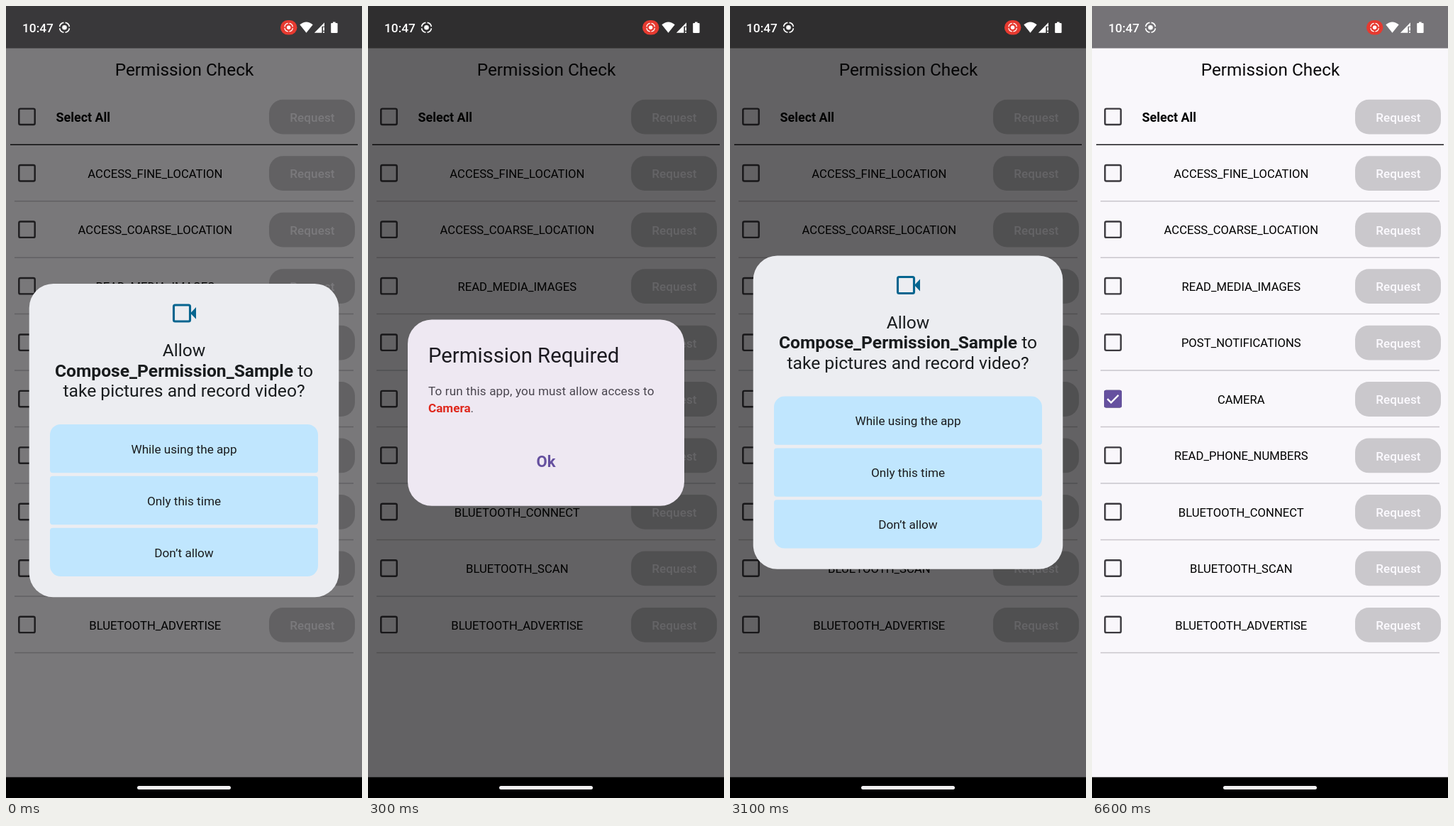
An HTML page for the animation above (8400 ms loop, 502 by 1115 pixels).

```html
<!DOCTYPE html>
<html lang="en">
<head>
<meta charset="utf-8">
<title>Permission Check</title>
<style>
html, body { margin: 0; width: 100%; height: 100%; overflow: hidden; background: #000; }
svg { display: block; width: 100%; height: 100%; font-family: Roboto, sans-serif; }
</style>
</head>
<body>
<svg id="stage" viewBox="0 0 502 1115"></svg>
<script>
const PITCH = 79.46;
const NAMES = ["ACCESS_FINE_LOCATION", "ACCESS_COARSE_LOCATION", "READ_MEDIA_IMAGES",
  "POST_NOTIFICATIONS", "CAMERA", "READ_PHONE_NUMBERS", "BLUETOOTH_CONNECT",
  "BLUETOOTH_SCAN", "BLUETOOTH_ADVERTISE"];
const MID = 'text-anchor="middle"';
const BOLD = 'font-weight="700"';

const rect = (x, y, w, h, fill, r = 0, extra = "") =>
  `<rect x="${x}" y="${y}" width="${w}" height="${h}" rx="${r}" fill="${fill}" ${extra}/>`;
const text = (s, x, y, size, fill = "#000", extra = "") =>
  `<text x="${x}" y="${y}" font-size="${size}" fill="${fill}" ${extra}>${s}</text>`;
const line = (x1, x2, y, color, w) =>
  `<path d="M${x1} ${y}H${x2}" stroke="${color}" stroke-width="${w}"/>`;
const cover = id => rect(0, 0, 502, 1115, "#000", 0, `id="${id}"`);

function row(i, label) {
  const y = 156.2 + i * PITCH;
  return rect(18.3, y - 11.6, 22.4, 22.4, "none", 2, 'stroke="#3b393e" stroke-width="2.4"') +
    label(y + 6.3) +
    rect(371, y - 24.4, 121, 48.8, "#cac8cc", 19.5) +
    text("Request", 431.9, y + 6.6, 17.1, "#fcfaff", MID + ' font-weight="500" letter-spacing=".1"');
}

function page() {
  let s = rect(0, 0, 502, 1115, "#f9f7fb") + rect(0, 0, 502, 59.5, "#757377") +
    text("Permission Check", 251.5, 97.6, 24.4, "#0b0a0c", MID) +
    row(0, y => text("Select All", 70.6, y + .3, 17.9, "#000", BOLD)) +
    line(6, 496, 195.2, "#1b1a1d", 1.6);
  NAMES.forEach((name, i) => {
    s += row(i + 1, y => text(name, 210.3, y, 16.65, "#000", MID)) +
      line(12, 490, 274.7 + i * PITCH, "#c9c6cc", 1.5);
  });
  const y = 156 + 5 * PITCH;
  s += `<g id="check">${rect(17.1, y - 12.6, 24.8, 24.8, "#65509f", 2.5)}
    <path d="M21.7 ${y - .2}l5.2 5.2 10.4-10.4" fill="none" stroke="#fff" stroke-width="2.3"/></g>`;
  return s + rect(0, 1085.7, 502, 30, "#000");
}

function dialog() {
  return rect(56, 441.5, 390, 262.3, "#eee8f2", 34) +
    text("Permission Required", 85, 501.8, 29.3, "#1c1a20") +
    text("To run this app, you must allow access to", 85, 548, 17.1, "#4a464f", 'letter-spacing=".14"') +
    text(`<tspan fill="#df291e" ${BOLD}>Camera</tspan>.`, 85, 572.4, 17.1, "#4a464f") +
    text("Ok", 251, 649.3, 22, "#65509f", MID + " " + BOLD) +
    rect(85, 606, 332, 68.7, "#000", 0, 'id="press"');
}

// A choice bar with separate top and bottom corner radii
function choice(label, i, top, bottom) {
  const y = 198 + 72.9 * i, b = y + 68.3;
  return `<path fill="#c0e6fe" d="M62 ${y + top}a${top} ${top} 0 0 1 ${top}-${top}H${440 - top}
    a${top} ${top} 0 0 1 ${top} ${top}V${b - bottom}a${bottom} ${bottom} 0 0 1-${bottom} ${bottom}
    H${62 + bottom}a${bottom} ${bottom} 0 0 1-${bottom}-${bottom}z"/>` +
    text(label, 251, y + 40.8, 17.15, "#1a1c1e", MID);
}

function sheet() {
  const title = [`Allow`, `<tspan ${BOLD}>Compose_Permission_Sample</tspan> to`,
    "take pictures and record video?"];
  return rect(32.7, 0, 436.6, 441.3, "#ecedf1", 34) +
    rect(236.5, 30, 23, 23, "none", 2, 'stroke="#06658f" stroke-width="3.1"') +
    '<path d="M260 41.5l8-8.4v16.8z" fill="#06658f"/>' +
    title.map((s, i) => text(s, 251, 102 + 28.7 * i, 24.65, "#191c1e", MID)).join("") +
    choice("While using the app", 0, 15, 4) +
    choice("Only this time", 1, 4, 4) +
    choice("Don’t allow", 2, 4, 15);
}

const target = (x, y, r, w) =>
  `<circle cx="${x}" cy="${y}" r="${r * .47}" fill="#fff"/>
   <circle cx="${x}" cy="${y}" r="${r}" fill="none" stroke="#fff" stroke-width="${w}"
     pathLength="40" stroke-dasharray="8 2" stroke-dashoffset="-1"/>`;

function bars() {
  return text("10:47", 23, 36.8, 17.3, "#fff", 'font-weight="500"') +
    target(82.5, 30.3, 7, 1.6) +
    rect(387, 20, 23.4, 20.4, "#e63a30", 10.2) + target(398.6, 30.2, 5.8, 1.3) +
    `<g fill="#fff"><path d="M414.3 26.3q9.2-7.6 18.4 0l-9.2 11.5z"/>
     <path d="M434.8 37.8l14.2-14.6v5.5h-3.6v9.1z"/>
     <path d="M447 29.8h2v5h-2zM447 36h2v1.8h-2z"/>
     <path d="M461 22.6h3.6v1.5h2a1 1 0 0 1 1 1v12a1 1 0 0 1-1 1h-7.4a1 1 0 0 1-1-1v-12a1 1 0 0 1 1-1h1.8z"/></g>` +
    rect(185, 1098, 132, 5, "#f2f1f3", 2.5);
}

document.getElementById("stage").innerHTML = page() + cover("dimLow") +
  `<g id="dialog">${dialog()}</g>` + cover("dimHigh") + `<g id="sheet">${sheet()}</g>` + bars();

const LOOP = 8400, STEP = 100, DIM = .6;
const PRESS = 2700, GRANT = 6500;
const $ = id => document.getElementById(id);
const fade = (id, a) => $(id).setAttribute("opacity", a);
const shift = (id, y) => $(id).setAttribute("transform", `translate(0 ${y})`);
const span = (t, from, length) => Math.min(1, Math.max(0, (t - from) / length));
const easeOut = u => 1 - (1 - u) ** 2;

function draw(t) {
  const before = t < PRESS;

  // Dialog rises in after the first sheet leaves, sinks away after the press
  const open = span(t, 26, 200), close = span(t, PRESS + 50, 150);
  const seen = easeOut(open) - close;
  fade("dialog", seen);
  shift("dialog", 26 * (1 - easeOut(open)) + 12 * close);
  fade("dimLow", DIM * (open ** 2 - close));
  fade("press", t >= PRESS && t < PRESS + STEP ? .3 : 0);

  // Sheet settles upward, then accelerates off the bottom
  const enter = before ? 1 : easeOut(span(t, PRESS + 80, 300));
  const leave = span(t, before ? -115 : 6240, 265);
  fade("sheet", enter * (1 - leave ** 10));
  shift("sheet", 351.5 + 50 * (1 - enter) + 764 * leave ** 3.55);
  fade("dimHigh", DIM * enter * (1 - leave ** 2.3));

  fade("check", t >= GRANT ? 1 : 0);
}

const start = performance.now();
function tick() {
  const t = (performance.now() - start) % LOOP;
  draw(Math.floor(t / STEP) * STEP);
  requestAnimationFrame(tick);
}
tick();
</script>
</body>
</html>
```
